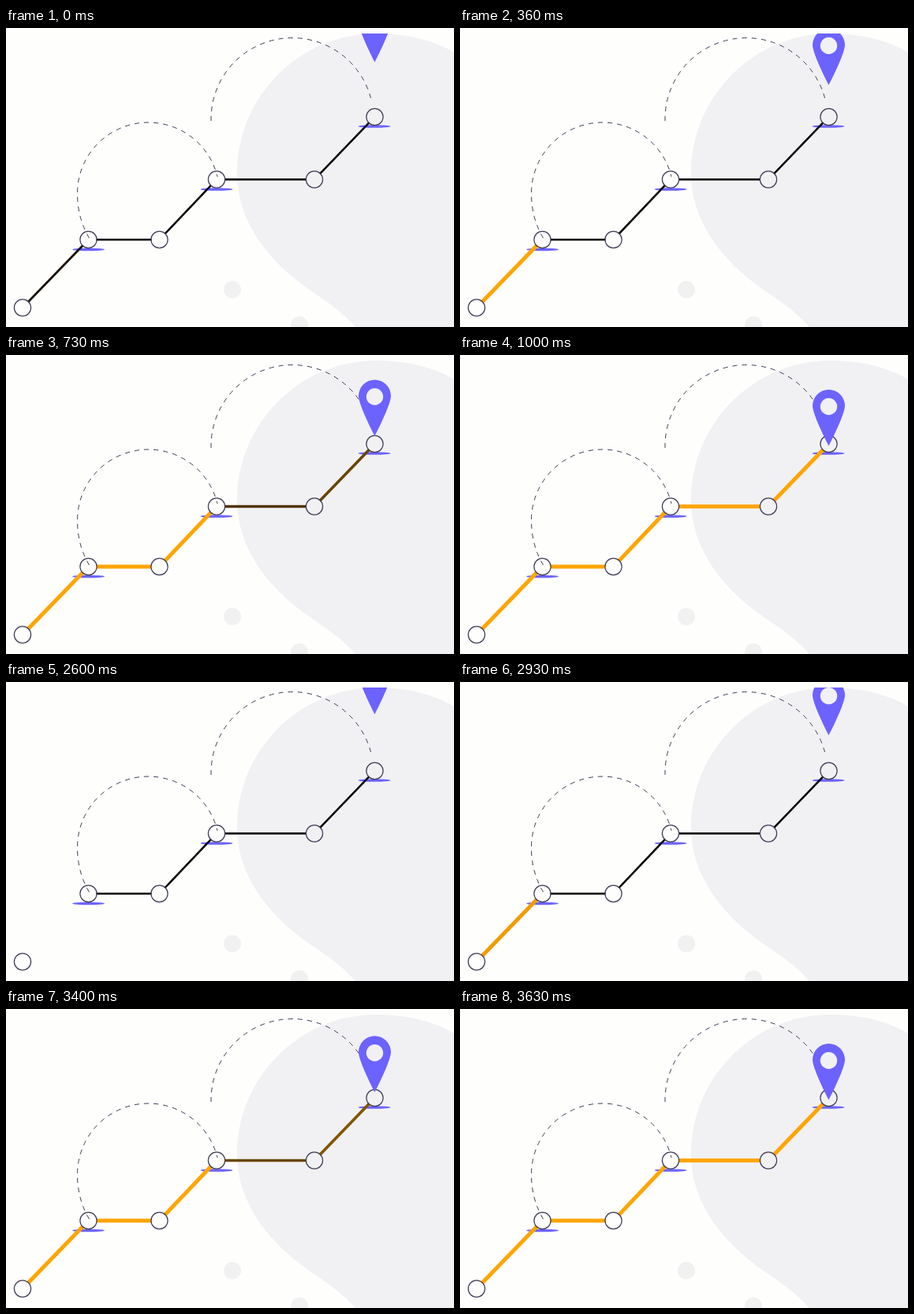
Recreate the animation shown at these times as an HTML page. Size 568 px wide and 380 px high, loop 3.8 s.

```html
<!DOCTYPE html>
<html lang="en">
<head>
<meta charset="utf-8">
<title>Route</title>
<style>
  html, body { margin: 0; width: 100%; height: 100%; overflow: hidden; background: #fefefd; }
  svg { display: block; width: 100%; height: 100%; }
  .blob { fill: #f1f1f4; }
  .dot { fill: #f1f1f2; }
  .shadow { fill: #6c63ff; }
  .arc, .node { fill: none; stroke: #3f3d56; }
  .arc { stroke-dasharray: 6.2 6; }
  .node { stroke-width: 1.2; }
</style>
</head>
<body>
<svg viewBox="0 0 568 380">
  <clipPath id="view"><rect y="7" width="568" height="373"/></clipPath>
  <path class="blob" d="M293 185C293 87 372 7 470 7C508 7 543 16 568 31V380H443C425 360 410 350 385 333C345 305 293 255 293 185Z"/>
  <circle class="dot" cx="287" cy="332.5" r="11"/>
  <circle class="dot" cx="372" cy="377.5" r="11"/>
  <g class="shadow">
    <ellipse cx="104.5" cy="281.5" rx="20.5" ry="1.8"/>
    <ellipse cx="267" cy="205" rx="20.5" ry="1.8"/>
    <ellipse cx="467" cy="125" rx="20.5" ry="1.8"/>
  </g>
  <g id="route"></g>
  <path class="arc" d="M105.5 267C96 251 90.5 232 90.5 211A90 90 0 0 1 268 189"/>
  <path class="arc" d="M260 118V114A103 103 0 0 1 462.5 89"/>
  <g clip-path="url(#view)">
    <g id="pin">
      <path fill="#6c63ff" d="M467.5 115.5C467.5 115.5 447 76 447 64.5A20.5 20.5 0 0 1 488 64.5C488 76 467.5 115.5 467.5 115.5Z"/>
      <circle cx="467.5" cy="65.5" r="10.7" fill="#f1f1f4"/>
    </g>
  </g>
</svg>
<script>
  const LOOP = 3800, RESTART = 2600, LEAD = 30;
  const nodes = [[21, 355.5], [104.5, 269], [194.5, 269], [267, 192.5], [391, 192.5], [467.5, 113]];
  // Start and duration of each segment's change to orange, in ms
  const timing = [[0, 350], [375, 385], [375, 385], [640, 385], [600, 390]];
  // Pin height above its resting place over time
  const drop = [[0, 74.5], [390, 43], [600, 25], [760, 12.5], [860, 5.5], [1000, 0]];

  const route = document.getElementById('route');
  const pin = document.getElementById('pin');

  function add(tag, attrs) {
    const el = document.createElementNS('http://www.w3.org/2000/svg', tag);
    for (const name in attrs) el.setAttribute(name, attrs[name]);
    return route.appendChild(el);
  }

  const lines = timing.map((_, i) => {
    const [x1, y1] = nodes[i], [x2, y2] = nodes[i + 1];
    const k = 10 / Math.hypot(x2 - x1, y2 - y1);
    const dx = (x2 - x1) * k, dy = (y2 - y1) * k;
    return add('line', { x1: x1 + dx, y1: y1 + dy, x2: x2 - dx, y2: y2 - dy });
  });
  nodes.forEach(([cx, cy]) => add('circle', { class: 'node', cx, cy, r: 10.6 }));

  const clamp = v => Math.min(1, Math.max(0, v));

  function pinHeight(t) {
    const i = drop.findIndex(([time]) => time > t);
    if (i < 0) return 0;
    const [t0, h0] = drop[i - 1], [t1, h1] = drop[i];
    return h0 + (h1 - h0) * (t - t0) / (t1 - t0);
  }

  function draw(time) {
    const phase = time < RESTART ? time + LEAD : time - RESTART;
    lines.forEach((line, i) => {
      const p = clamp((phase - timing[i][0]) / timing[i][1]);
      line.setAttribute('stroke', `rgb(${255 * p}, ${165 * p}, 0)`);
      line.setAttribute('stroke-width', 2.5 + 2.5 * p);
    });
    lines[0].setAttribute('visibility', phase < LEAD ? 'hidden' : 'visible');
    pin.setAttribute('transform', `translate(0 ${-pinHeight(phase)})`);
  }

  let start;
  function tick(now) {
    start ??= now;
    draw((now - start) % LOOP);
    requestAnimationFrame(tick);
  }
  draw(0);
  requestAnimationFrame(tick);
</script>
</body>
</html>
```
